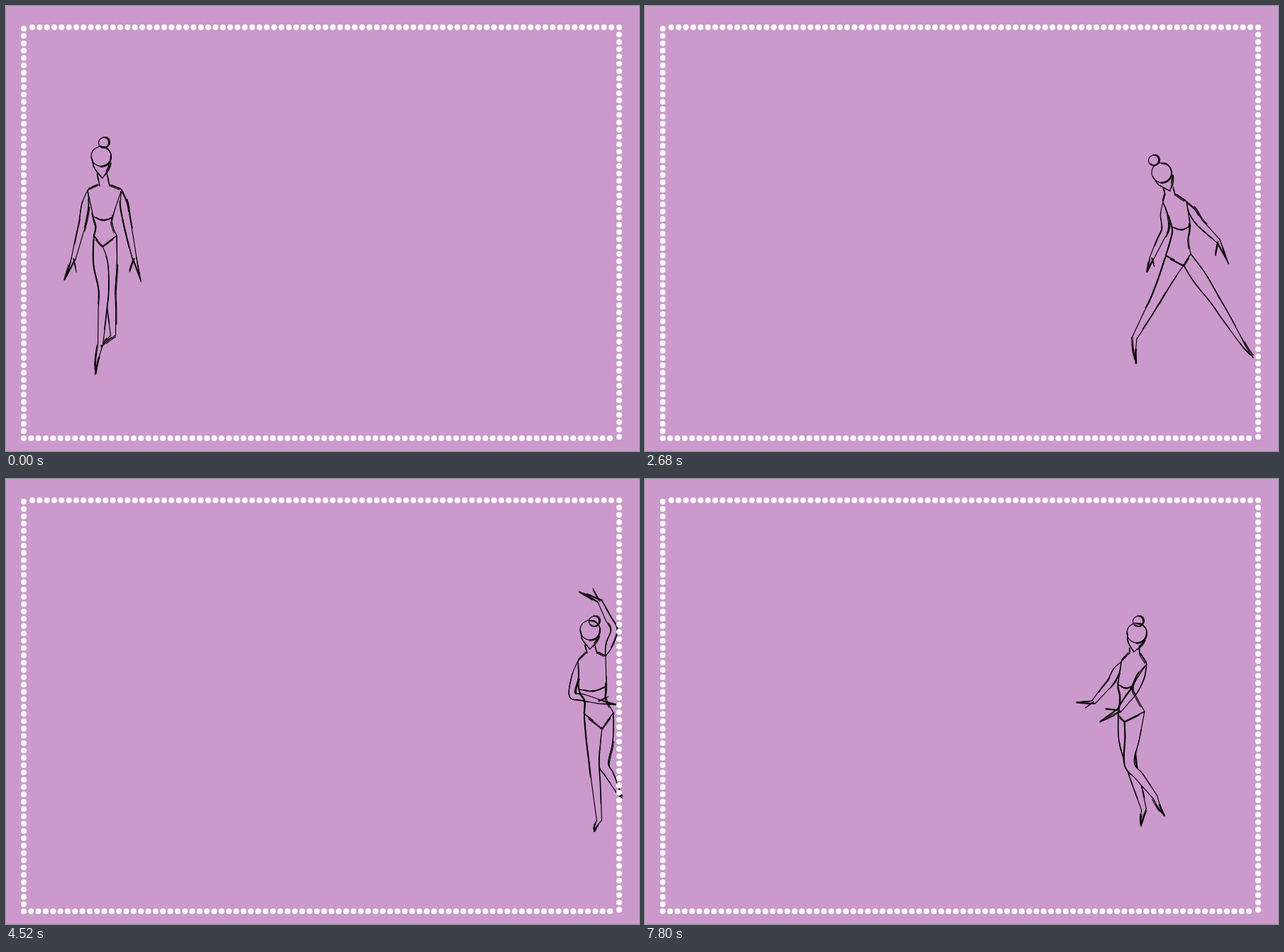
Animation of 892 by 628 pixels, one loop 8 s. Source, as an HTML page with a canvas:

```html
<!DOCTYPE html>
<html lang="en">
<head>
<meta charset="utf-8">
<title>Sketched dancer</title>
<style>
html, body { margin: 0; width: 100%; height: 100%; overflow: hidden; background: #cc99cc; }
canvas { display: block; }
</style>
</head>
<body>
<canvas id="stage" width="892" height="628"></canvas>
<script>
const ctx = document.getElementById('stage').getContext('2d');
const LOOP = 8000, HOLD = 160, BACKDROP = '#cc99cc';

// Each pose is a skeleton; the drawn outline is built around its joints.
const poses = [
  { front: 'L', bun: [138, 193], skull: [134, 212], chin: [136, 243], neck: [139, 256],
    shoulderL: [115, 260], elbowL: [108, 304], wristL: [95, 357], tipL: [83, 386],
    shoulderR: [163, 259], elbowR: [170, 302], wristR: [181, 356], tipR: [190, 388],
    bustL: [123, 297], waistL: [127, 312], hipL: [124, 325],
    bustR: [150, 299], waistR: [151, 312], hipR: [156, 324], crotch: [136, 339],
    kneeL: [138, 401], ankleL: [133, 478], toeL: [126, 519],
    kneeR: [147, 403], ankleR: [151, 465], toeR: [134, 481] },
  { front: 'L', bun: [122, 219], skull: [139, 229], chin: [151, 259], neck: [143, 267],
    shoulderL: [120, 275], elbowL: [108, 313], wristL: [83, 355], tipL: [55, 364],
    shoulderR: [156, 273], elbowR: [173, 316], wristR: [194, 351], tipR: [219, 362],
    bustL: [122, 311], waistL: [120, 328], hipL: [118, 340],
    bustR: [164, 298], waistR: [146, 325], hipR: [147, 352], crotch: [139, 357],
    kneeL: [151, 402], ankleL: [109, 448], toeL: [96, 474],
    kneeR: [132, 405], ankleR: [124, 478], toeR: [138, 512] },
  { front: 'L', bun: [717, 218], skull: [728, 235], chin: [740, 261], neck: [740, 269],
    shoulderL: [730, 277], elbowL: [733, 314], wristL: [714, 356], tipL: [708, 375],
    shoulderR: [763, 276], elbowR: [781, 305], wristR: [808, 332], tipR: [822, 363],
    bustL: [743, 312], waistL: [741, 330], hipL: [734, 353],
    bustR: [768, 311], waistR: [766, 330], hipR: [769, 350], crotch: [759, 366],
    kneeL: [719, 416], ankleL: [690, 468], toeL: [692, 504],
    kneeR: [803, 415], ankleR: [836, 467], toeR: [857, 496] },
  { front: 'L', bun: [829, 201], skull: [823, 213], chin: [823, 240], neck: [826, 248],
    shoulderL: [806, 257], elbowL: [798, 304], wristL: [835, 314], tipL: [860, 318],
    shoulderR: [845, 250], elbowR: [857, 213], wristR: [837, 173], tipR: [808, 159],
    bustL: [808, 297], waistL: [816, 313], hipL: [815, 332],
    bustR: [846, 293], waistR: [846, 310], hipR: [856, 330], crotch: [840, 352],
    kneeL: [829, 400], ankleL: [836, 482], toeL: [829, 497],
    kneeR: [842, 402], ankleR: [860, 436], toeR: [868, 450] },
  { front: 'L', bun: [711, 289], skull: [697, 292], chin: [680, 317], neck: [696, 327],
    shoulderL: [680, 332], elbowL: [640, 326], wristL: [603, 324], tipL: [575, 323],
    shoulderR: [714, 335], elbowR: [732, 368], wristR: [719, 372], tipR: [714, 360],
    bustL: [676, 364], waistL: [694, 380], hipL: [697, 395],
    bustR: [721, 371], waistR: [722, 378], hipR: [733, 387], crotch: [718, 408],
    kneeL: [671, 433], ankleL: [707, 482], toeL: [684, 490],
    kneeR: [771, 427], ankleR: [824, 467], toeR: [846, 491] },
  { front: 'R', bun: [695, 201], skull: [693, 217], chin: [689, 244], neck: [690, 249],
    shoulderL: [671, 258], elbowL: [657, 285], wristL: [632, 315], tipL: [609, 315],
    shoulderR: [707, 261], elbowR: [690, 298], wristR: [668, 327], tipR: [641, 342],
    bustL: [667, 290], waistL: [670, 308], hipL: [667, 334],
    bustR: [688, 292], waistR: [694, 310], hipR: [704, 328], crotch: [676, 342],
    kneeL: [686, 408], ankleL: [703, 466], toeL: [699, 490],
    kneeR: [683, 402], ankleR: [719, 449], toeR: [732, 475] }
];

// When each pose is reached; a repeated pose is held.
const keys = [
  { at: 0, pose: 0 }, { at: 1760, pose: 1 }, { at: 2680, pose: 2 }, { at: 3600, pose: 3 },
  { at: 5200, pose: 3 }, { at: 6240, pose: 4 }, { at: 6440, pose: 4 }, { at: 7800, pose: 5 }
];

const lerp = (a, b, f) => [a[0] + (b[0] - a[0]) * f, a[1] + (b[1] - a[1]) * f];
const shift = (p, d, k) => [p[0] + d[0] * k, p[1] + d[1] * k];
const unit = (x, y) => { const n = Math.hypot(x, y) || 1; return [x / n, y / n]; };
const normal = (a, b) => unit(a[1] - b[1], b[0] - a[0]);
const smooth = f => f * f * (3 - 2 * f);
const noise = n => { const s = Math.sin(n * 127.1 + 3.7) * 43758.5453; return s - Math.floor(s); };
let seed = 0;
const random = () => noise(++seed);

function curve(pts) {
  const last = pts.length - 1, count = last * 6;
  return Array.from({ length: count + 1 }, (_, k) => {
    const u = k / 6, i = Math.min(last - 1, Math.floor(u)), f = u - i;
    const [a, b, c, d] = [-1, 0, 1, 2].map(o => pts[Math.max(0, Math.min(last, i + o))]);
    return [0, 1].map(n => b[n] + f / 2 * (c[n] - a[n] +
      f * (2 * a[n] - 5 * b[n] + 4 * c[n] - d[n] + f * (3 * (b[n] - c[n]) + d[n] - a[n]))));
  });
}

// One pen line and two broken passes beside it.
function sketch(...pts) {
  const line = curve(pts), last = line.length - 1;
  for (let pass = 0; pass < 3; pass++) {
    const from = pass ? Math.floor(random() * last * .5) : 0;
    const to = pass ? Math.ceil(from + last * (.3 + random() * .4)) : last;
    const dx = pass ? random() * 3 - 1.5 : 0, dy = pass ? random() * 3 - 1.5 : 0;
    ctx.beginPath();
    line.slice(from, to + 1).forEach(p => ctx.lineTo(p[0] + dx, p[1] + dy));
    ctx.stroke();
  }
}

function loop(center, radius) {
  sketch(...Array.from({ length: 10 }, (_, i) => {
    const angle = i * Math.PI / 4.5 - 1.8;
    return [center[0] + Math.cos(angle) * radius, center[1] + Math.sin(angle) * radius];
  }));
}

// The two outlines of a jointed limb; widths run from its upper half to its end.
function limbSides(starts, joint, end, [upper, middle, lower, tip]) {
  const root = lerp(starts[0], starts[1], .5);
  const n1 = normal(root, joint), n2 = normal(joint, end);
  const bend = unit(n1[0] + n2[0], n1[1] + n2[1]);
  return starts.map((start, i) => {
    const side = i ? -1 : 1;
    return [start, shift(lerp(root, joint, .45), n1, side * upper), shift(joint, bend, side * middle),
      shift(lerp(joint, end, .4), n2, side * lower), shift(end, n2, side * tip)];
  });
}

function drawLeg(j, s) {
  const hip = j['hip' + s], knee = j['knee' + s], ankle = j['ankle' + s], toe = j['toe' + s];
  const root = lerp(hip, j.crotch, .5), n = normal(root, knee);
  const hipFirst = (hip[0] - root[0]) * n[0] + (hip[1] - root[1]) * n[1] > 0;
  const starts = hipFirst ? [hip, j.crotch] : [j.crotch, hip];
  const sides = limbSides(starts, knee, ankle, [10, 7, 6, 3.5]);
  ctx.beginPath();
  [...curve(sides[0]), ...curve(sides[1]).reverse()].forEach(p => ctx.lineTo(...p));
  ctx.fill();
  sides.forEach(side => {
    sketch(...side);
    sketch(side[4], shift(lerp(side[4], toe, .5), normal(ankle, toe), 1), toe);
  });
}

function drawArm(j, s) {
  const shoulder = j['shoulder' + s], wrist = j['wrist' + s], tip = j['tip' + s];
  const sides = limbSides([shoulder, shoulder], j['elbow' + s], wrist, [5, 5, 4.5, 3]);
  sides.forEach(side => {
    sketch(...side);
    sketch(side[4], tip);
  });
  const n = normal(wrist, tip), reach = Math.hypot(tip[0] - wrist[0], tip[1] - wrist[1]);
  const inward = s === 'L' ? -1 : 1;
  sketch(wrist, shift(lerp(wrist, tip, .5), n, inward * reach * .35));
}

function drawHead(j) {
  const across = normal(j.skull, j.chin), throat = lerp(j.skull, j.chin, .8);
  loop(j.bun, 7.5);
  loop(j.skull, 14);
  for (const side of [-1, 1]) {
    sketch(shift(j.skull, across, side * 13.5),
      shift(lerp(j.skull, j.chin, .5), across, side * 10.5), j.chin);
    sketch([throat[0] + side * 7, throat[1]], [j.neck[0] + side * 7, j.neck[1] - 2]);
  }
}

function drawTorso(j) {
  for (const s of ['L', 'R']) {
    sketch([j.neck[0] + (s === 'L' ? -7 : 7), j.neck[1] - 4], j['shoulder' + s]);
    sketch(j['shoulder' + s], j['bust' + s], j['waist' + s], j['hip' + s]);
    sketch(j['hip' + s], j.crotch);
  }
  const middle = lerp(j.bustL, j.bustR, .5);
  sketch(j.bustL, shift(middle, normal(j.bustL, j.bustR), 5), j.bustR);
}

function drawDancer(from, to, mix, dx, dy) {
  const j = {};
  for (const name in from) if (name !== 'front') j[name] = lerp(from[name], to[name], mix);
  const front = (mix < .5 ? from : to).front;
  seed = 0;
  ctx.save();
  ctx.translate(dx, dy);
  ctx.strokeStyle = '#000';
  ctx.fillStyle = BACKDROP;
  ctx.lineWidth = 1.15;
  ctx.lineCap = ctx.lineJoin = 'round';
  drawLeg(j, front === 'L' ? 'R' : 'L');
  drawLeg(j, front);
  drawTorso(j);
  drawArm(j, 'L');
  drawArm(j, 'R');
  drawHead(j);
  ctx.restore();
}

function dotRow(x0, y0, x1, y1, count) {
  for (let i = 0; i < count; i++) {
    ctx.beginPath();
    ctx.arc(...lerp([x0, y0], [x1, y1], i / (count - 1)), 4, 0, Math.PI * 2);
    ctx.fill();
  }
}

function drawBorder() {
  ctx.fillStyle = '#fff';
  dotRow(37, 30, 853, 30, 80);
  dotRow(25, 32, 25, 600, 56);
  dotRow(25, 610, 851, 610, 81);
  dotRow(864, 30, 864, 608, 57);
}

function render(now) {
  const time = now % LOOP;
  const index = keys.findLastIndex(key => key.at <= time);
  const key = keys[index], next = keys[index + 1] || { at: LOOP, pose: key.pose };
  const drawn = Math.floor((time - key.at) / HOLD) * HOLD;
  const mix = key.pose === next.pose ? 0 : smooth(drawn / (next.at - key.at));
  const arc = Math.sin(Math.PI * mix);
  let dx = 0, dy = 0;
  if (key.pose === 0) dx = 40 * arc;
  if (key.pose === 1) dy = -60 * arc;
  if (key.pose === 3 && next.pose === 3) {
    const turn = (Math.floor(time / 40) - 1) * Math.PI / 2;
    dx = 5 * Math.sin(turn);
    dy = 2 * (Math.cos(turn) - 1);
  }
  ctx.fillStyle = BACKDROP;
  ctx.fillRect(0, 0, 892, 628);
  drawDancer(poses[key.pose], poses[next.pose], mix, dx, dy);
  drawBorder();
}

const start = performance.now();
function tick() {
  render(performance.now() - start);
  requestAnimationFrame(tick);
}
tick();
</script>
</body>
</html>
```
